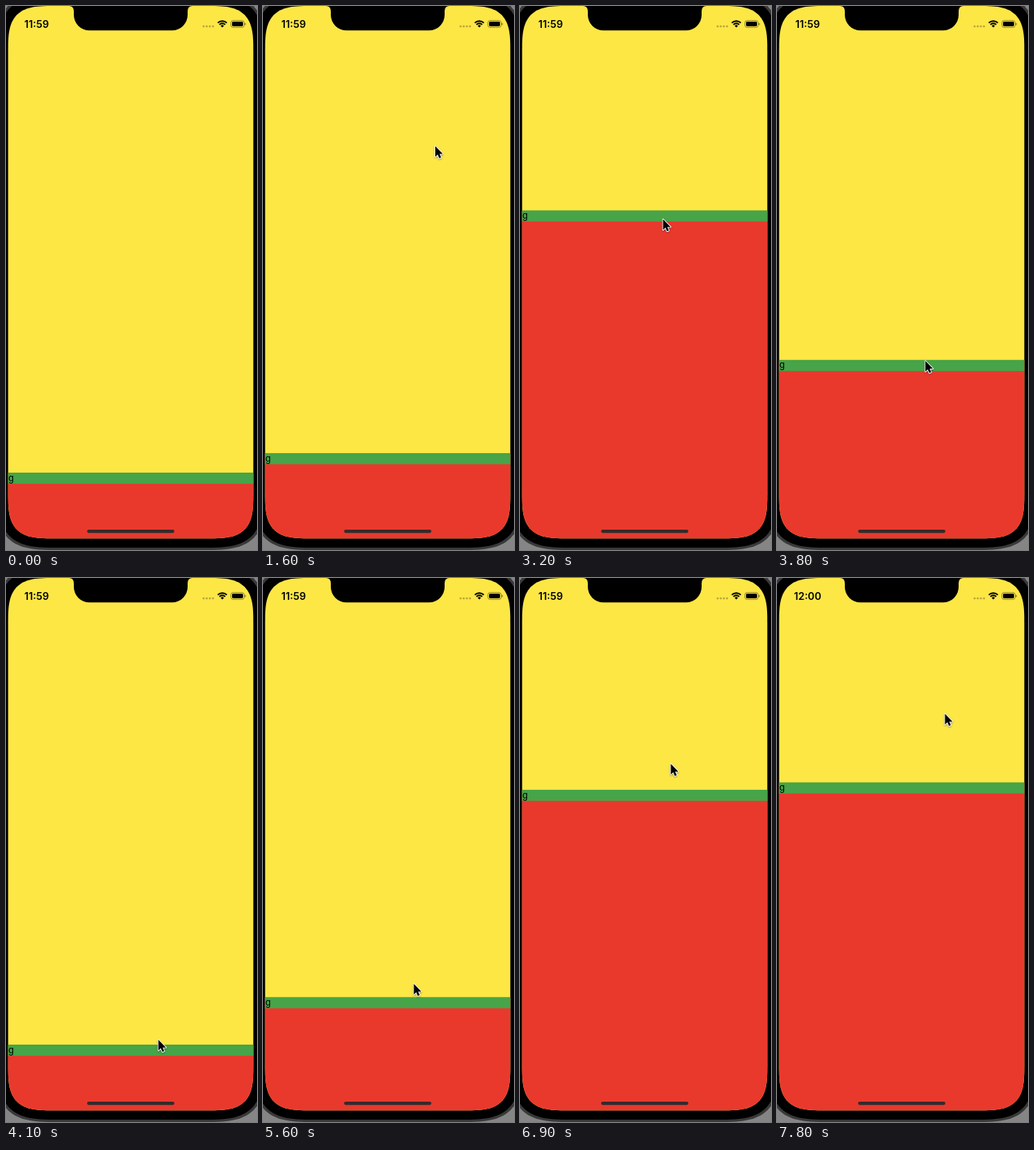
An HTML page with a canvas for the animation above (8000 ms loop, 322 by 696 pixels).

```html
<!DOCTYPE html>
<html lang="en">
<head>
<meta charset="utf-8">
<title>Draggable sheet</title>
<style>
html, body { margin: 0; width: 100%; height: 100%; overflow: hidden; background: #858585; }
canvas { display: block; width: 322px; height: 696px; }
</style>
</head>
<body>
<canvas id="stage"></canvas>
<script>
const W = 322, H = 696, LOOP = 8000, STEP = 100;
const YELLOW = '#fde745', GREEN = '#47a448', RED = '#e9392d';
const CLOSED = 597, OPEN = 261.5, PEEK = 525, BAR = 14.2;
const FONT = 'Inter, Roboto, sans-serif';

const canvas = document.getElementById('stage');
const ratio = window.devicePixelRatio || 1;
canvas.width = W * ratio;
canvas.height = H * ratio;
const c = canvas.getContext('2d');
c.scale(ratio, ratio);

const smooth = p => p * p * (3 - 2 * p);
const flick = p => 1 - (1 - p) ** 3;

// A move: begin, duration, end position, easing
const move = (begin, time, to, ease = smooth) => ({ begin, time, to, ease });

const barMoves = [
  move(1493, 641, [OPEN]),
  move(3450, 640, [CLOSED]),
  move(5000, 500, [PEEK]),
  move(5500, 400, [CLOSED]),
  move(6500, 575, [OPEN], flick)
];
const cursorMoves = [
  move(400, 600, [175, 603]),
  move(1200, 400, [220.5, 179]),
  move(1600, 300, [220.5, 110.5]),
  move(2400, 800, [183, 272.5]),
  move(3450, 640, [195, 590.5]),
  move(4700, 200, [193, 586]),
  move(5000, 500, [193, 519]),
  move(5900, 100, [193, 563]),
  move(6500, 575, [193, 228], flick),
  move(7400, 400, [215, 173.5])
];

function follow(start, moves, t) {
  let pos = start;
  for (const m of moves) {
    const p = Math.min(1, Math.max(0, (t - m.begin) / m.time));
    pos = pos.map((v, i) => v + (m.to[i] - v) * m.ease(p));
  }
  return pos;
}

function rect(x, y, w, h, color) {
  c.fillStyle = color;
  c.fillRect(x, y, w, h);
}

function round(x, y, w, h, r, color) {
  c.beginPath();
  c.roundRect(x, y, w, h, r);
  c.fillStyle = color;
  c.fill();
}

// Rectangle whose corners are superellipse arcs reaching e pixels along each side
function squircle(x, y, w, h, e) {
  const n = 32, bend = v => Math.sign(v) * Math.abs(v) ** (2 / 3.25);
  c.beginPath();
  for (let corner = 0; corner < 4; corner++) {
    const cx = corner === 0 || corner === 3 ? x + w - e : x + e;
    const cy = corner < 2 ? y + h - e : y + e;
    for (let i = 0; i <= n; i++) {
      const a = (corner + i / n) * Math.PI / 2;
      c.lineTo(cx + e * bend(Math.cos(a)), cy + e * bend(Math.sin(a)));
    }
  }
  c.closePath();
}

function shell(inset, e, color) {
  squircle(inset - 13, inset - 15, 346 - 2 * inset, 711 - 2 * inset, e);
  c.fillStyle = color;
  c.fill();
}

function notch() {
  c.beginPath();
  c.moveTo(80, -1);
  c.lineTo(81, 0);
  c.quadraticCurveTo(87, 0, 87, 7);
  c.lineTo(87, 11);
  c.arcTo(87, 31.3, 107, 31.3, 20);
  c.lineTo(213, 31.3);
  c.arcTo(233, 31.3, 233, 11, 20);
  c.lineTo(233, 7);
  c.quadraticCurveTo(233, 0, 239, 0);
  c.lineTo(240, -1);
  c.fillStyle = '#000';
  c.fill();
}

function text(str, x, y, font, align) {
  c.font = font + ' ' + FONT;
  c.textAlign = align;
  c.fillStyle = '#000';
  c.fillText(str, x, y);
}

function wifi(x, y) {
  const a = -Math.PI * 0.75, b = -Math.PI * 0.25;
  c.strokeStyle = c.fillStyle = '#000';
  c.lineWidth = 1.9;
  for (const r of [8.2, 5.2]) {
    c.beginPath();
    c.arc(x, y, r, a, b);
    c.stroke();
  }
  c.beginPath();
  c.moveTo(x, y);
  c.arc(x, y, 3, a, b);
  c.fill();
}

function statusBar(t) {
  text(t < 7500 ? '11:59' : '12:00', 39.3, 27.6, '600 13px', 'center');
  for (let i = 0; i < 4; i++) round(252.2 + i * 4, 24.8, 2.6, 2.6, 1.3, '#b5a53a');
  wifi(277.5, 27.5);
  c.beginPath();
  c.roundRect(288.6, 18.6, 16.8, 8.8, 2.6);
  c.strokeStyle = 'rgba(0,0,0,.45)';
  c.lineWidth = 0.9;
  c.stroke();
  round(290, 20, 14, 6, 1.4, '#000');
  round(306.3, 21.5, 1.2, 3, 0.6, 'rgba(0,0,0,.5)');
}

function cursor(x, y) {
  c.save();
  c.translate(x, y);
  c.beginPath();
  [[0.5, 0.3], [0.5, 14], [3.6, 11.1], [5.6, 15.8], [8, 14.8], [6, 10.2], [10.2, 10.2]]
    .forEach(p => c.lineTo(p[0], p[1]));
  c.closePath();
  c.shadowColor = 'rgba(0,0,0,.35)';
  c.shadowBlur = 2 * ratio;
  c.shadowOffsetY = ratio;
  c.lineWidth = 1.8;
  c.lineJoin = 'round';
  c.strokeStyle = '#fff';
  c.stroke();
  c.shadowColor = 'transparent';
  c.fillStyle = '#000';
  c.fill();
  c.restore();
}

function draw(t) {
  const [bar] = follow([CLOSED], barMoves, t);
  rect(0, 0, W, H, '#858585');
  shell(0, 80, '#393939');
  shell(3, 77, '#000');

  c.save();
  squircle(2.7, 0, 314.6, 681.2, 59);
  c.clip();
  rect(0, 0, W, H, YELLOW);
  rect(0, bar + 1, W, H, RED);
  rect(0, bar, W, BAR, GREEN);
  text('g', 3, bar + 10.6, '400 11.5px', 'left');
  c.restore();

  notch();
  statusBar(t);
  round(104, 670, 112, 4.2, 2.1, '#352a2b');
  if (t >= 500) cursor(...follow([196, 614], cursorMoves, t));
}

const start = performance.now();
function tick() {
  const t = (performance.now() - start) % LOOP;
  draw(Math.floor(t / STEP) * STEP);
  requestAnimationFrame(tick);
}
tick();
</script>
</body>
</html>
```
